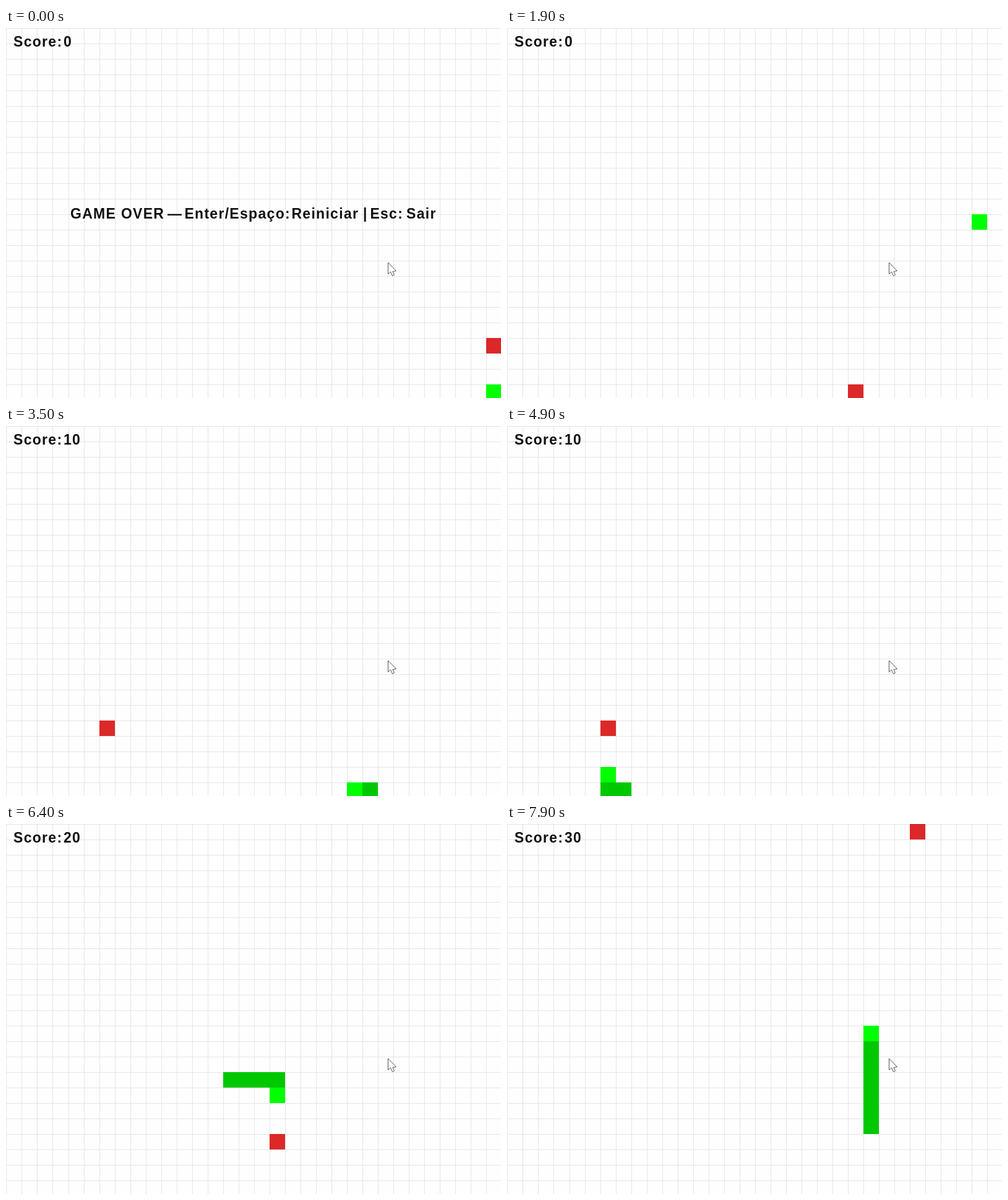
Animation, 800 px wide and 598 px high, one loop 8000 ms. Source, as an HTML page:

```html
<!DOCTYPE html>
<html lang="pt">
<head>
<meta charset="utf-8">
<title>Snake</title>
<style>
html, body { margin: 0; width: 100%; height: 100%; overflow: hidden; background: #fefefe; }
svg { display: block; }
text { font: bold 23px "Liberation Sans", Arial, sans-serif; letter-spacing: 1.3px; fill: #111; }
</style>
</head>
<body>
<svg width="800" height="598" viewBox="0 0 800 598">
  <path id="grid" fill="#e5e5e5"/>
  <g id="cells" shape-rendering="crispEdges"></g>
  <text x="12" y="30">Score:<tspan id="score" x="93">0</tspan></text>
  <text id="over" y="308"><tspan x="104">GAME OVER</tspan> <tspan x="261">—</tspan> <tspan x="288.4">Enter/Espaço:</tspan> <tspan x="461.4">Reiniciar</tspan> <tspan x="577">|</tspan> <tspan x="588.4">Esc:</tspan> <tspan x="647">Sair</tspan></text>
  <path d="M617.5 379V397.5L621.5 394L624.5 400.5L627.5 399L625 393.5L630.5 392.5Z" fill="#fff" stroke="#555"/>
</svg>
<script>
const LOOP = 8000, TICK = 100, RESTART = 800, SPEED = 1.2; // SPEED: cells per tick
const RED = '#dc2828', HEAD = '#00ff00', BODY = '#00c800';
const turns = [[16, 12], [30, 12], [30, 23], [6, 23], [6, 16], [17, 16], [17, 21], [23, 21], [23, 13]];
const foods = [[22, 23], [6, 19], [17, 20], [26, 0]];
const $ = id => document.getElementById(id);
const edge = k => Math.round(25.03 * k + 0.4);

const trail = [turns[0]];
for (const [tx, ty] of turns.slice(1)) {
  let [x, y] = trail.at(-1);
  while (x !== tx || y !== ty) {
    x += Math.sign(tx - x);
    y += Math.sign(ty - y);
    trail.push([x, y]);
  }
}
const meals = foods.slice(0, -1).map(([x, y]) => trail.findIndex(c => c[0] === x && c[1] === y));

let lines = '';
for (let k = 0; k < 32; k++) {
  lines += `M${edge(k)} 0h1v598h-1z`;
  if (k < 24) lines += `M0 ${edge(k)}h800v1h-800z`;
}
$('grid').setAttribute('d', lines);

const cell = ([x, y], color) =>
  `<rect x="${edge(x)}" y="${edge(y)}" width="${edge(x + 1) - edge(x)}" height="${edge(y + 1) - edge(y)}" fill="${color}"/>`;

function draw(time) {
  const over = time < RESTART;
  let snake = [[31, 23]], food = [31, 20], eaten = 0;
  if (!over) {
    const ticks = Math.floor(time / TICK) - 19;
    const step = Math.min(trail.length - 1, Math.floor(ticks * SPEED + 0.1) + 14);
    eaten = meals.filter(m => m <= step).length;
    // each meal adds one cell on each of two steps
    const length = meals.reduce((n, m) => n + Math.max(0, Math.min(2, step - m + 1)), 1);
    snake = trail.slice(Math.max(0, step - length + 1), step + 1).reverse();
    food = foods[eaten];
  }
  $('cells').innerHTML = cell(food, RED) + snake.map((c, i) => cell(c, i ? BODY : HEAD)).join('');
  $('score').textContent = eaten * 10;
  $('over').style.display = over ? '' : 'none';
}

const start = performance.now();
function frame() {
  draw((performance.now() - start) % LOOP);
  requestAnimationFrame(frame);
}
frame();
</script>
</body>
</html>
```
